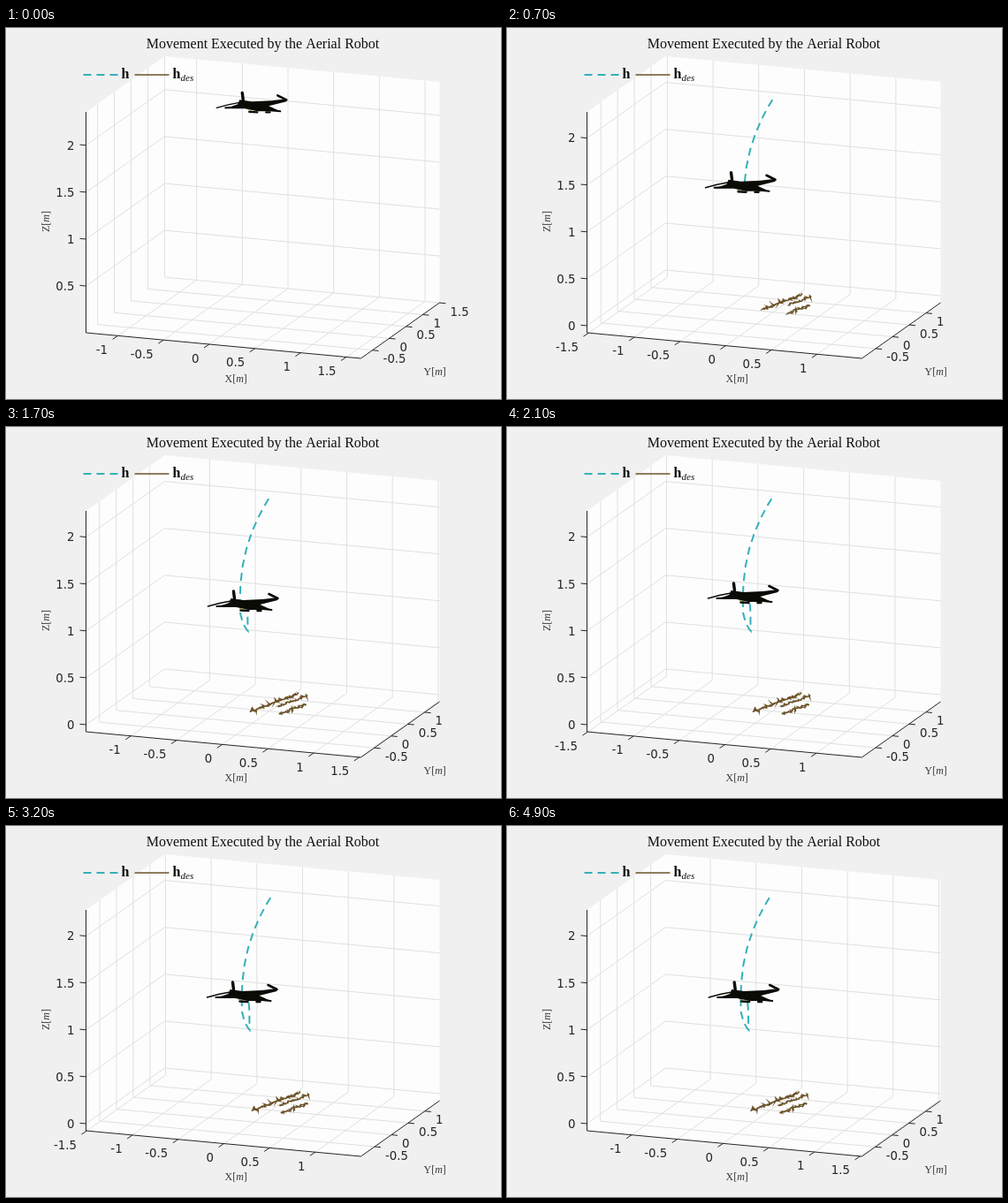
An HTML page with a canvas for the animation above (5 s loop, 560 by 420 pixels).

```html
<!DOCTYPE html>
<html lang="en">
<head>
<meta charset="utf-8">
<title>Aerial robot movement</title>
<style>
html, body { margin: 0; width: 100%; height: 100%; overflow: hidden; background: #f0f0f0; }
canvas { display: block; }
</style>
</head>
<body>
<canvas id="stage" width="560" height="420"></canvas>
<script>
const ctx = document.getElementById('stage').getContext('2d');
const LOOP = 5000, STEP = 100;
const BACK = '#f0f0f0', INK = '#262626', GRID = '#e0e0e0', TEAL = '#35b0b8', BROWN = '#6b5228', BLACK = '#0b0b06';
const SERIF = '"Liberation Serif", serif', SANS = '"DejaVu Sans", sans-serif';

const mix = (a, b, u) => a + (b - a) * u;

// Smooth 0..1 ramp between two times
function ramp(t, from, to) {
  const u = Math.min(1, Math.max(0, (t - from) / (to - from)));
  return u * u * (3 - 2 * u);
}

// Slow sideways sway once the fall is over
const sway = t => ramp(t, 800, 1200) * Math.cos((t - 2100) / 1170 * 2 * Math.PI);

// Screen x of the X = 0 tick
const originX = t => 229.5 + 17.5 * ramp(t, 0, 600) - 2.1 * ramp(t, 800, 1200) + 1.2 * sway(t);

// Robot position for an X origin of 245: a curved fall, then a rise to hover
function robotAt(t) {
  if (t > 1170) {
    const u = ramp(t, 1170, 1930);
    return [mix(274, 271.5, u) - 1.8 * u * sway(t), mix(231, 190, u)];
  }
  const y = mix(78, 231, ramp(t, 0, 1170));
  const x = y < 200 ? 265 + 32 * ((200 - y) / 118) ** 2.3 : 265 + 9 * ((y - 200) / 31) ** 3;
  return [x, y];
}

let seed = 7;
const rand = () => (seed = seed * 16807 % 2147483647) / 2147483647;

// Noisy strand from its right end to its left end
function strand(x1, y1, x2, y2) {
  const n = Math.round((x1 - x2) * 1.4);
  return Array.from({ length: n + 1 }, (_, i) => {
    const spread = rand() < 0.08 ? 7 : 2;
    return [mix(x1, x2, i / n) + (rand() - 0.5) * 3, mix(y1, y2, i / n) + (rand() - 0.5) * spread];
  });
}
const strands = [strand(330, 302, 277, 322), strand(341, 304, 309, 316), strand(339, 314, 309, 325)];

function trace(pts) {
  ctx.beginPath();
  pts.forEach(p => ctx.lineTo(p[0], p[1]));
}
function line(pts, color, width = 1, dash = []) {
  trace(pts);
  ctx.strokeStyle = color;
  ctx.lineWidth = width;
  ctx.setLineDash(dash);
  ctx.stroke();
}
function fill(pts, color) {
  trace(pts);
  ctx.fillStyle = color;
  ctx.fill();
}
function text(str, x, y, font, align = 'left') {
  ctx.font = font;
  ctx.textAlign = align;
  ctx.fillText(str, x, y);
  return ctx.measureText(str).width;
}
function unitLabel(name, x, y) {
  ctx.fillStyle = '#3a3a3a';
  x += text(name + '[', x, y, '12px ' + SERIF);
  x += text('m', x, y, 'italic 12px ' + SERIF);
  text(']', x, y, '12px ' + SERIF);
}

// Box coordinates 0..1 to screen
const proj = (u, v, w) => [90 + 311 * u + 89 * v, 345 + 29 * u - 63 * v - 250 * w];

// Half-unit marks that lie on an axis, as [label, place]
function marks(toUnit) {
  return Array.from({ length: 11 }, (_, i) => [String(i / 2 - 2), toUnit(i / 2 - 2)])
    .filter(([, p]) => p >= 0 && p <= 1);
}

function axes(x0, v0, z0) {
  fill([proj(0, 0, 0), proj(0, 0, 1), proj(0, 1, 1), proj(1, 1, 1), proj(1, 1, 0), proj(1, 0, 0)], '#fdfdfe');
  const xs = marks(k => (x0 - 90 + 103.4 * k) / 311);
  const ys = marks(k => v0 + 0.426 * k);
  const zs = marks(k => (345 - z0 + 106.2 * k) / 250);
  xs.forEach(([, u]) => line([proj(u, 0, 0), proj(u, 1, 0), proj(u, 1, 1)], GRID));
  ys.forEach(([, v]) => line([proj(1, v, 0), proj(0, v, 0), proj(0, v, 1)], GRID));
  zs.forEach(([, w]) => line([proj(0, 0, w), proj(0, 1, w), proj(1, 1, w)], GRID));
  line([proj(0, 0, 1), proj(0, 0, 0), proj(1, 0, 0), proj(1, 1, 0)], INK);

  function tick([x, y], dx, dy, label, lx, ly, align) {
    line([[x, y], [x + dx, y + dy]], INK);
    ctx.fillStyle = INK;
    text(label, x + lx, y + ly, '13.33px ' + SANS, align);
  }
  xs.forEach(([s, u]) => tick(proj(u, 0, 0), -6, 4, s, -11.5, 20.5, 'right'));
  ys.forEach(([s, v]) => tick(proj(1, v, 0), 7, 0.7, s, 12, 14.5, 'left'));
  zs.forEach(([s, w]) => tick(proj(0, 0, w), -7, -0.7, s, -13, 4.8, 'right'));
}

function labels() {
  ctx.fillStyle = '#101010';
  text('Movement Executed by the Aerial Robot', 290, 23, '16px ' + SERIF, 'center');
  line([[87, 53], [128, 53]], TEAL, 2, [9, 6]);
  line([[145, 53], [184, 53]], BROWN, 1.4);
  text('h', 130, 57, 'bold 16px ' + SERIF);
  text('h', 188, 57, 'bold 16px ' + SERIF);
  text('des', 197, 60, 'italic 11px ' + SERIF);
  unitLabel('X', 247, 401);
  unitLabel('Y', 472, 393);
  ctx.save();
  ctx.translate(48, 231);
  ctx.rotate(-Math.PI / 2);
  unitLabel('Z', 0, 0);
  ctx.restore();
}

function robot(x, y) {
  ctx.save();
  ctx.translate(x, y);
  ctx.lineCap = 'round';
  fill([[-18, -5], [-4, -3], [18, -4], [35, -6], [35, -3], [15, 2], [28, 8], [2, 8], [-12, 5], [-34, 5], [-20, 0]], BLACK);
  line([[-44, 4], [-31, 0.5], [-18, -2]], BLACK, 1.4);
  line([[-34, 4], [-14, 3], [8, 6], [28, 8]], BLACK, 2);
  line([[-15, -13], [-14, -5]], BLACK, 3.4);
  line([[25, -10], [35, -5]], BLACK, 2.6);
  line([[-7, 8.5], [2, 9]], BLACK, 2.4);
  line([[12, 9], [16, 9]], BLACK, 2.4);
  line([[-8, 6.5], [-5, 7]], '#8a842c');
  ctx.restore();
}

function draw(t) {
  const x0 = originX(t);
  const v0 = 0.36 + 0.00165 * (x0 - 229.5);
  const z0 = t < STEP ? 345.2 : 337;
  const dv = v0 - 0.3856;
  ctx.setTransform(1, 0, 0, 1, 0, 0);
  ctx.fillStyle = BACK;
  ctx.fillRect(0, 0, 560, 420);
  ctx.translate(0.5, 0);
  axes(x0, v0, z0);

  // Data moves with the axes
  ctx.save();
  ctx.translate(x0 - 245 + 89 * dv, (x0 - 245) * 29 / 311 - 63 * dv + z0 - 337);
  const grown = Math.min(1, t / 840);
  strands.forEach(s => line(s.slice(0, Math.floor(s.length * grown)), BROWN, 1.6));
  const trail = [];
  for (let s = STEP; s <= t; s += STEP) trail.push(robotAt(s));
  line(trail, TEAL, 2, [9, 6]);
  robot(...robotAt(t));
  ctx.restore();
  labels();
}

function frame() {
  draw(Math.floor(performance.now() % LOOP / STEP) * STEP);
  requestAnimationFrame(frame);
}
frame();
</script>
</body>
</html>
```
